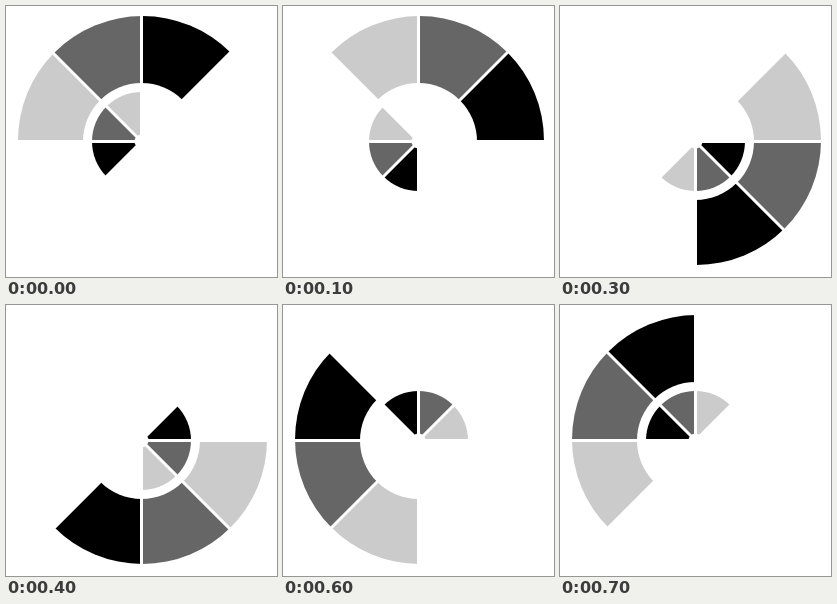
Write an HTML page that moves like this. It is 271 px wide and 271 px high and loops after 800 ms.

```html
<!DOCTYPE html>
<html lang="en">
<head>
<meta charset="utf-8">
<title>Spinner</title>
<style>
  html, body { margin: 0; width: 100%; height: 100%; overflow: hidden; background: #fff; }
  svg { display: block; width: 100vw; height: 100vh; }
  .wedge { fill: #fff; animation: sweep 800ms step-end infinite; }
  .gaps { stroke: #fff; stroke-width: 3; }
  @keyframes sweep {
    0% { fill: #000; }
    12.5% { fill: #666; }
    25% { fill: #cbcbcb; }
    37.5%, 100% { fill: #fff; }
  }
</style>
</head>
<body>
<svg viewBox="0 0 271 271">
  <clipPath id="big"><circle cx="136.5" cy="134.5" r="124.5"/></clipPath>
  <clipPath id="small"><circle cx="135.5" cy="135.5" r="49.5"/></clipPath>
  <g id="outer" clip-path="url(#big)"></g>
  <circle cx="135.5" cy="135.5" r="58.5" fill="#fff"/>
  <g id="inner" clip-path="url(#small)"></g>
  <circle cx="135.5" cy="135.5" r="7" fill="#fff"/>
  <path class="gaps" d="M135.5 0V271M0 135.5H271M0 0L271 271M271 0L0 271"/>
</svg>
<script>
  const C = 135.5, R = 180, STEP = 100, COUNT = 8;

  const point = k => {
    const a = k * Math.PI / 4;
    return (C + R * Math.sin(a)).toFixed(3) + ' ' + (C - R * Math.cos(a)).toFixed(3);
  };

  // start(k): the step at which wedge k turns black
  function addWedges(id, start) {
    const group = document.getElementById(id);
    for (let k = 0; k < COUNT; k++) {
      const wedge = document.createElementNS('http://www.w3.org/2000/svg', 'path');
      wedge.setAttribute('class', 'wedge');
      wedge.setAttribute('d', `M${C} ${C}L${point(k)}L${point(k + 1)}Z`);
      wedge.style.animationDelay = (start(k) - COUNT) * STEP + 'ms';
      group.append(wedge);
    }
  }

  addWedges('outer', k => k);
  addWedges('inner', k => (13 - k) % COUNT);
</script>
</body>
</html>
```
